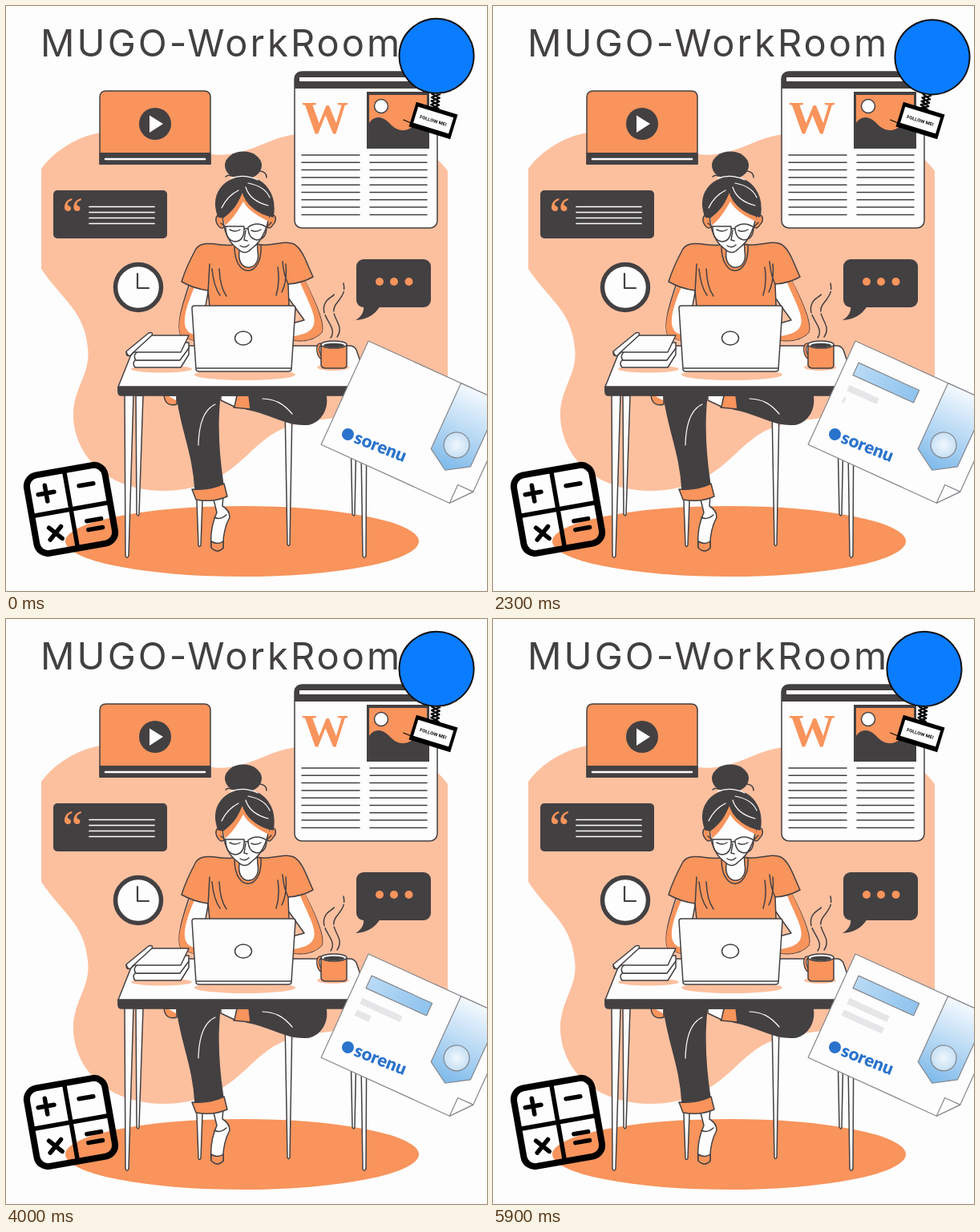
An HTML page for the animation above (6000 ms loop, 600 by 730 pixels).

```html
<!DOCTYPE html>
<html lang="en">
<head>
<meta charset="utf-8">
<title>Study desk</title>
<style>
html, body { margin: 0; width: 100%; height: 100%; overflow: hidden; background: #fefdfe; }
svg { display: block; width: 600px; height: 730px; }
.d { fill: #434042; }
.o { fill: #f8945c; }
.l { fill: #fdc09f; }
.w { fill: #fefdfe; }
.k { stroke: #434042; stroke-width: 1.5; stroke-linejoin: round; stroke-linecap: round; }
.n { fill: none; }
.p { fill: none; stroke: #fefdfe; stroke-width: 1.2; stroke-linecap: round; }
.g { stroke: #85878b; stroke-width: 1.2; stroke-linejoin: round; }
.b { fill: none; stroke: #000; stroke-linecap: round; stroke-linejoin: round; }
</style>
</head>
<body>
<svg viewBox="0 0 600 730">
<defs>
  <linearGradient id="ribbon" x2="0" y2="1">
    <stop offset="0" stop-color="#f4f9fe"/><stop offset="1" stop-color="#7db9ea"/>
  </linearGradient>
  <linearGradient id="bar">
    <stop offset="0" stop-color="#b9daf5"/><stop offset="1" stop-color="#8fc3ee"/>
  </linearGradient>
  <radialGradient id="seal">
    <stop offset="0" stop-color="#f1f7fd"/><stop offset="1" stop-color="#c6e0f5"/>
  </radialGradient>
</defs>

<!-- backdrop -->
<path class="l" d="M44 203C60 181 88 163 118 158C165 150 215 178 256 185C300 190 325 164 362 160C430 150 515 155 551 206V470L440 506C405 520 375 512 338 531C300 552 285 592 222 603C165 612 103 591 87 533C74 483 107 465 102 427C98 380 70 367 44 328Z"/>
<ellipse class="o" cx="294.500" cy="668" rx="220.500" ry="44"/>
<text class="d" x="43" y="63" font-family="Inter, sans-serif" font-size="47" letter-spacing="3.100">MUGO-WorkRoom</text>

<!-- video -->
<path class="o k" d="M117 197V114Q117 106 125 106H247Q255 106 255 114V197Z"/>
<path class="d" d="M116.500 183H255.500V198H116.500Z"/>
<path class="p" style="stroke-width:2.600" d="M124 191H248"/>
<circle class="d" cx="186" cy="147" r="20"/>
<path class="w" d="M179 136.500V158L196 147Z"/>

<!-- quote -->
<rect class="d" x="59" y="230" width="142" height="60" rx="5"/>
<text class="o" x="82.500" y="281" text-anchor="middle" font-family="'Noto Serif', serif" font-size="57">“</text>
<path class="p" style="stroke-width:1.700" d="M104 250.500H185M104 257.500H185M104 264.500H185M104 271.500H185"/>

<!-- clock -->
<circle class="w" cx="165" cy="351" r="28.500" stroke="#434042" stroke-width="5.500"/>
<path class="k n" style="stroke-width:2.200" d="M164 334V352H178"/>

<!-- browser -->
<rect class="w k" x="360" y="82" width="178" height="195" rx="9"/>
<path class="d" d="M360 103V91Q360 82 369 82H529Q538 82 538 91V103Z"/>
<path class="w" d="M366 89H533V94H366Z"/>
<text class="o" x="369" y="159" font-family="'Liberation Serif', serif" font-weight="700" font-size="58">W</text>
<path class="d" d="M450 107H528V178H450Z"/>
<path class="o" d="M453 111H525V138C515 140 508 156 494 155C480 154 478 140 465 139C458 139 455 143 453 146Z"/>
<circle class="w k" cx="468" cy="125" r="8.500"/>
<path class="k n" id="columns"/>

<!-- chat -->
<rect class="d" x="437" y="316" width="93" height="60" rx="9"/>
<path class="d" d="M446 372Q448 385 436 392Q457 391 467 374Z"/>
<g class="o"><circle cx="466" cy="344" r="5"/><circle cx="484" cy="344" r="5"/><circle cx="502.500" cy="344" r="5"/></g>

<!-- far table legs -->
<g class="w k">
  <path d="M237 590L240 673Q241 676 243 673L246 590Z"/>
  <path d="M348 500L351 672Q352.500 675 354 672L357 500Z"/>
  <path d="M162 486L163 634Q165 638 166 634L171 486Z"/>
  <path d="M429 486L432 634Q434 638 435 634L438 486Z"/>
</g>

<!-- legs -->
<path class="w k" d="M258 612L263 632Q254 652 256 675Q264 684 271 676Q270 655 279 638Q279 629 270 624L271 610Z"/>
<path class="o k" d="M256 668Q264 673 271 668V676Q264 684 256 676Z"/>
<path class="k n" d="M260 638Q267 642 275 635"/>
<path class="d k" d="M213 486H267C264 512 263 546 271 598L236 604C234 560 219 530 213 486Z"/>
<path class="o k" d="M232 603Q253 605 272 596L276 612Q258 620 237 616Z"/>
<path class="d k" d="M302 486H399C402 503 393 518 378 522C350 525 330 508 300 503Z"/>
<path class="p" d="M320 490C336 491 345 495 357 509M261 497Q241 506 240 548"/>
<path class="o k" d="M288 486H303L305 503L284 501Z"/>
<path class="w k" d="M268 486H288L285 500L268 492Z"/>
<path class="o k" d="M197 486H213V497Q199 501 197 486Z"/>
<path class="w" d="M203 487H212V492Z"/>

<!-- arms and shirt -->
<path class="w k" d="M229 346C221 370 212 397 218 411L236 418L236 378L249 374L253 352Z"/>
<path class="o" d="M229 350C221 372 212 397 218 411L235 418V410C216 406 222 381 235 351Z"/>
<path class="w k" d="M351 345L372 342C384 365 398 396 394 407C386 416 372 419 357 417V396L372 392L352 364Z"/>
<path class="o" d="M366 343L373 343C384 365 398 396 394 407C386 416 372 419 358 417V412C402 406 382 382 366 343Z"/>
<path class="o k" d="M291 297C270 303 247 289 237 303C231 314 224 328 219 344Q235 353 252 355L254 375H353L352 347Q369 346 383 338C375 321 370 303 359 297C346 291 328 302 313 297Z"/>
<path class="k n" d="M254 322L252 358M345 319C346 331 348 339 352 347M257 328Q259 350 267 361M266 328Q267 351 275 362M349 322Q351 343 344 357M339 326Q342 345 337 361M285 300C285 341 320 340 318 299"/>
<path class="w k" d="M290 290L291 306C287 334 319 332 314 306L313 288Z"/>

<!-- head -->
<path class="o k" d="M270 262C262 257 260 267 264 273Q268 280 273 275ZM328 262C338 257 338 268 333 273Q329 280 325 275Z"/>
<path class="w k" d="M271 248C268 270 274 293 289 303Q298 312 306 303C322 292 329 270 329 248L300 222Z"/>
<path class="o" d="M295 231L271 263L273 274C283 266 289 256 296 244C302 255 314 262 328 269V255Z"/>
<ellipse class="d" cx="296" cy="199" rx="23" ry="17.500"/>
<path class="d k" d="M265 263C254 234 273 214 297 214C322 213 338 235 333 263C316 260 299 248 295 231C291 240 287 252 271 264Z"/>
<path class="p" d="M280 215Q297 209 314 217M290 230Q276 237 269 252M299 226Q304 243 327 249M302 221Q323 225 329 239"/>
<path class="k n" d="M317 206Q325 207 325 214M274 213Q277 210 281 212"/>
<path class="k n" d="M274 275H297Q298 293 286 294Q274 293 274 275ZM302 276Q313 268 325 276Q325 291 313 292Q302 290 302 276ZM297 279Q300 276 302 279M279 279Q286 283 292 279M306 280Q312 283 318 279M299 280L297 292L301 293M292 299Q298 303 303 298M326 275L331 270M273 275L268 271"/>

<!-- table -->
<path class="w k" d="M164 424H429Q434 424 437 429L453 475V481H140V475L158 430Q160 424 164 424Z"/>
<path class="d k" d="M140 475H453V482Q453 486 449 486H144Q140 486 140 482Z"/>
<g class="w k">
  <path d="M148 486L149 686Q151 691 153 686L159 486Z"/>
  <path d="M442 486L445 686Q447 691 449 686L450 486Z"/>
</g>
<g class="l">
  <ellipse cx="298" cy="460" rx="63" ry="7"/>
  <ellipse cx="194" cy="453" rx="38" ry="4.500"/>
  <ellipse cx="408" cy="451" rx="20" ry="4"/>
</g>

<!-- laptop -->
<path class="w k" d="M235 374H358Q361 374 361 377L356 453Q356 456 352 456H241Q237 456 237 453L232 377Q232 374 235 374Z"/>
<path class="k n" d="M238 452H356"/>
<ellipse class="w k" cx="296" cy="414.500" rx="10.500" ry="8.500"/>

<!-- books -->
<path class="w k" d="M161 442H216L228 426V435L218 451H161Q157 446 161 442Z"/>
<path class="w k" d="M163 432L178 420H228V427L217 442H162Q158 437 163 432Z"/>
<path class="w k" d="M152 431L181 411H228L218 432H160Q150 441 150 432Z"/>
<path class="w k" d="M150 431L178 408Q184 406 182 411L158 433Q153 441 150 431Z"/>

<!-- cup -->
<path class="k n" style="stroke-width:4.500" d="M394 423C386 419 389 441 396 439"/>
<path class="n" stroke="#f8945c" stroke-width="2" d="M394 423C386 419 389 441 396 439"/>
<path class="o k" d="M393 423V448Q394 452 399 452H420Q425 452 425 448V423Z"/>
<ellipse class="w k" cx="409" cy="422.500" rx="16" ry="4.500"/>
<ellipse class="d" cx="409" cy="423.500" rx="13" ry="2.800"/>
<path class="k n" stroke-dasharray="31 3 28 3 40" d="M405 414C415 400 390 388 398 371C401 364 407 364 411 358M413 413C424 397 402 388 411 373C417 364 424 360 421 346"/>

<!-- certificate -->
<g transform="translate(452 418) rotate(24.500)">
  <path class="w g" d="M0 0H197V117L176 142H0Z"/>
  <path class="w g" d="M176 142V117H197Z"/>
  <path class="g" fill="url(#ribbon)" d="M127 0H181V90L154 107L127 90Z"/>
  <circle class="g" fill="url(#seal)" cx="154" cy="72.500" r="16"/>
  <rect id="bar0" class="g" fill="url(#bar)" x="15" y="23" height="17"/>
  <rect id="bar1" fill="#e6e6e8" x="16" y="53" height="8"/>
  <rect id="bar2" fill="#e6e6e8" x="16" y="69" height="8"/>
  <g fill="#2a73cc" transform="translate(17 124) rotate(-3)">
    <circle cx="8.500" cy="-7" r="7.500"/>
    <text x="18" y="0" font-family="Lato, sans-serif" font-weight="900" font-size="22">sorenu</text>
  </g>
</g>

<!-- calculator -->
<g class="b" transform="translate(81 628) rotate(-10)" stroke-width="8">
  <rect x="-49.500" y="-49.500" width="99" height="99" rx="14"/>
  <path stroke-width="5.500" d="M0 -50V50M-50 0H50"/>
  <path stroke-width="5.500" d="M-37 -25H-17M-27 -35V-15M15 -27H33M-31 18L-17 34M-16 19L-32 33M17 18H35M17 29H35"/>
</g>

<!-- bouncing badge -->
<g id="swing">
  <path class="b" stroke-width="2.200" id="spring"/>
  <circle cx="0" cy="-88" r="46.500" fill="#0a7cff" stroke="#111" stroke-width="2"/>
</g>
<g transform="translate(533 143) rotate(17)">
  <path class="b" stroke-width="1" d="M-36 10L-25 11"/>
  <path d="M-27 -16H27V16H-27Z"/>
  <path fill="#fff" d="M-23 -11H23V10H-23Z"/>
  <text y="2" text-anchor="middle" font-family="Inter, sans-serif" font-weight="700" font-size="5.500">FOLLOW ME!</text>
</g>
</svg>
<script>
const LOOP = 6000, STEP = 100, SWING = 2000, FILL = 1600;
const $ = id => document.getElementById(id);
const set = (id, name, value) => $(id).setAttribute(name, value);

// [time, degrees] within one swing
const angles = [[0, 4.6], [200, 6.6], [400, 17], [550, 29], [700, 36.2], [800, 34.8],
                [1000, 37], [1200, 32], [1400, 20], [1600, 11], [1900, 5.2], [2000, 4.6]];
// [start, duration, full width]
const bars = [[100, 350, 83], [440, 350, 55], [680, 340, 55]];

function angleAt(t) {
  const i = angles.findIndex(a => a[0] > t);
  const [t0, a0] = angles[i - 1], [t1, a1] = angles[i];
  return a0 + (a1 - a0) * (t - t0) / (t1 - t0);
}

function build() {
  let lines = "";
  for (let i = 0; i < 9; i++) {
    const y = 186 + i * 9.3;
    lines += `M369 ${y}H441M454 ${y}H525`;
  }
  set("columns", "d", lines);

  let coil = "";
  for (const side of [-1, 1]) {
    coil += "M3 -18";
    for (let i = 1; i < 6; i++) coil += `L${3 + side * (i % 2 ? 5 : -5)} ${-18 - i * 4.5}`;
  }
  set("spring", "d", coil);
}

function draw(t) {
  set("swing", "transform", `translate(530 150) rotate(${angleAt(t % SWING)})`);
  bars.forEach(([start, span, width], i) => {
    const p = Math.min(1, Math.max(0, (t % FILL - start) / span));
    set("bar" + i, "width", width * p);
    set("bar" + i, "visibility", p ? "visible" : "hidden");
  });
}

const begin = performance.now();
function tick() {
  const t = (performance.now() - begin) % LOOP;
  draw(Math.floor(t / STEP) * STEP);
  requestAnimationFrame(tick);
}
build();
draw(0);
requestAnimationFrame(tick);
</script>
</body>
</html>
```
